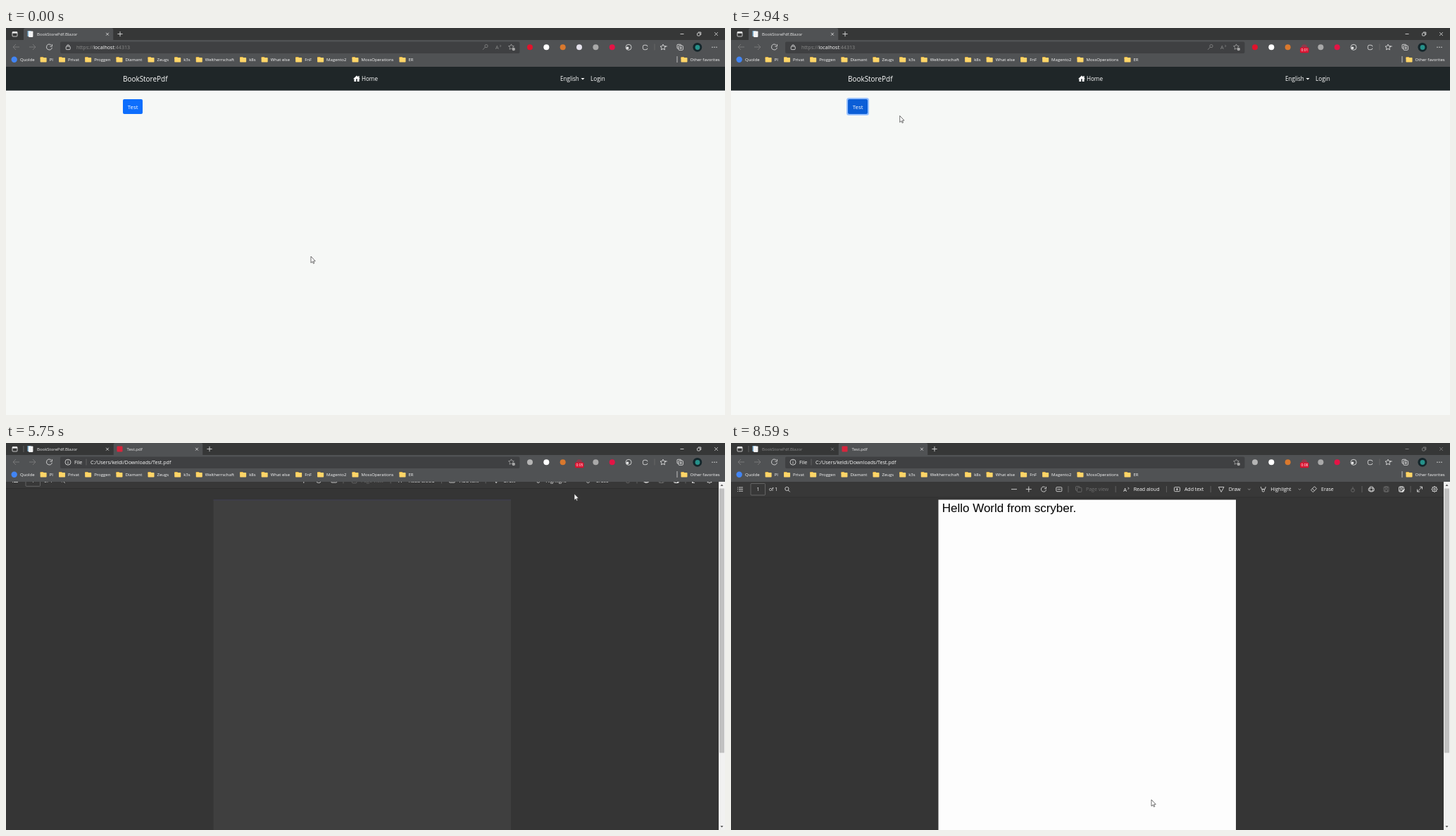
An HTML page with a canvas that plays this animation: 1021 px wide and 549 px high, repeating every 8.62 s.

```html
<!DOCTYPE html>
<html lang="en">
<head>
<meta charset="utf-8">
<title>Browser PDF download</title>
<style>
html, body { margin: 0; width: 100%; height: 100%; overflow: hidden; background: #353535; }
canvas { display: block; width: 1021px; height: 549px; }
</style>
</head>
<body>
<canvas id="stage" width="1021" height="549"></canvas>
<script>
const W = 1021, H = 549, LOOP = 8620;
const c = document.getElementById('stage').getContext('2d');
const UI = '"Open Sans", "Noto Sans", sans-serif';
const PDF_FONT = '"Liberation Sans", Arial, sans-serif';
const LIGHT = '#ececec', DIM = '#8a8a8a', FAINT = '#707070';
const BAR = '#505254', TITLE = '#363737', FIELD = '#3f4042', PAPER = '#f6f8f6';

// Moments at which the state changes, in ms
const CLICK = 1750, DOWNLOAD = 3500, OPEN = 5370, DARK = 5560,
  SHRINK = 5640, SLIDE = 5700, RENDER = 5930, BLUR = 8540;

// Cursor stops: time, x, y
const stops = [
  [40, 433, 324], [830, 183.6, 117], [2750, 183.6, 117], [3660, 451, 153],
  [5000, 807, 72], [7130, 807, 72], [7560, 663.5, 337], [8300, 597, 506]
];
const bookmarks = ['PI', 'Privat', 'Proggen', 'Diamant', 'Zeugs', 'k3s', 'Weltherrschaft',
  'k8s', 'What else', 'FnF', 'Magento2', 'MossOperations', 'ER'];

const clamp = v => Math.max(0, Math.min(1, v));
const mix = (a, b, k) => a + (b - a) * k;

function box(x, y, w, h, fill, r = 0) {
  c.beginPath();
  c.roundRect(x, y, w, h, r);
  c.fillStyle = fill;
  c.fill();
}
function pen(color, width = 0.8) {
  c.strokeStyle = color;
  c.lineWidth = width;
  c.stroke();
}
function frame(x, y, w, h, color = LIGHT, r = 1) {
  c.beginPath();
  c.roundRect(x, y, w, h, r);
  pen(color);
}
function trace(x, y, pts) {
  c.beginPath();
  for (let i = 0; i < pts.length; i += 2) c.lineTo(x + pts[i], y + pts[i + 1]);
}
function line(x, y, pts, color = LIGHT, width) {
  trace(x, y, pts);
  pen(color, width);
}
function shape(x, y, pts, color) {
  trace(x, y, pts);
  c.closePath();
  c.fillStyle = color;
  c.fill();
}
function ring(x, y, r, color = LIGHT, from = 0, to = Math.PI * 2) {
  c.beginPath();
  c.arc(x, y, r, from, to);
  pen(color);
}
function dot(x, y, r, color = LIGHT) {
  c.beginPath();
  c.arc(x, y, r, 0, 7);
  c.fillStyle = color;
  c.fill();
}
// Returns the right edge of the text
function text(s, x, y, size = 6, color = '#fafafa', font = UI) {
  c.font = `${size}px ${font}`;
  c.fillStyle = color;
  c.fillText(s, x, y);
  return x + c.measureText(s).width;
}

// Small icons, each centred on x, y
function minus(x, y, r, color) {
  line(x, y, [-r, 0, r, 0], color);
}
function plus(x, y, r, color) {
  minus(x, y, r, color);
  line(x, y, [0, -r, 0, r], color);
}
function cross(x, y, r, color) {
  line(x, y, [-r, -r, r, r], color);
  line(x, y, [-r, r, r, -r], color);
}
function chevron(x, y) {
  line(x, y, [-1.7, -0.8, 0, 0.9, 1.7, -0.8], '#aaa');
}
function divider(x, y, color = '#6c6c6c') {
  line(x, y, [0, -4.5, 0, 4.5], color);
}
function triangle(x, y, w, h, color) {
  shape(x, y, [-w, 0, w, 0, 0, h], color);
}
function arrow(x, y, dir) {
  line(x, y, [-5 * dir, 0, 4 * dir, 0], '#808080');
  line(x, y, [0, -4, 4 * dir, 0, 0, 4], '#808080');
}
function reload(x, y, r) {
  ring(x, y, r, LIGHT, 0.2, 5.4);
  line(x, y, [r, -r, r, -r / 4, r / 4, -r / 4]);
}
function star(x, y, r, color = LIGHT) {
  c.beginPath();
  for (let i = 0; i < 10; i++) {
    const a = i * Math.PI / 5 - Math.PI / 2, d = i % 2 ? r / 2 : r;
    c.lineTo(x + Math.cos(a) * d, y + Math.sin(a) * d);
  }
  c.closePath();
  pen(color);
}
function folder(x, label) {
  box(x - 4.5, 41, 4.5, 3, '#e5b443', 0.6);
  box(x - 4.5, 42, 9, 6.4, '#ffd568', 0.7);
  return text(label, x + 8.5, 47);
}
function pages(x, y, color, fill) {
  frame(x - 4, y - 4, 5.6, 5.8, color);
  box(x - 2, y - 2.2, 6.4, 6.2, fill);
  frame(x - 2, y - 2.2, 6.4, 6.2, color);
}
function letterA(x, y, color) {
  text('A', x - 4, y + 3, 7.4, color);
  line(x + 2.5, y - 1.5, [0, -1.5, 1.2, 0, 0, 1.5], color);
}
function disk(x, y, color) {
  frame(x - 3.5, y - 3.5, 7, 7, color);
  frame(x - 1.8, y - 3.5, 3.6, 2.2, color, 0);
  frame(x - 2, y + 0.5, 4, 3, color, 0);
}

function cursorAt(t) {
  const i = stops.findIndex(s => s[0] > t);
  if (i < 0) return stops[stops.length - 1].slice(1);
  const b = stops[i], a = stops[Math.max(0, i - 1)];
  const k = clamp((t - a[0]) / (b[0] - a[0]));
  return [mix(a[1], b[1], k), mix(a[2], b[2], k)];
}

function drawCursor(x, y, hand) {
  if (hand) {
    c.beginPath();
    c.roundRect(x - 1, y, 2.2, 8, 1);
    c.roundRect(x - 3, y + 5, 8, 7.5, 2);
    pen('#222', 1.4);
    c.fillStyle = '#fff';
    c.fill();
    return;
  }
  shape(x, y, [0, 0, 0, 9.2, 2.1, 7.3, 3.5, 10.2, 4.8, 9.6, 3.5, 6.8, 6.2, 6.6], '#fff');
  pen('#333', 0.7);
}

function pageIcon(x) {
  box(x - 3.5, 4, 5, 8, '#80b4d6', 0.6);
  box(x - 2, 4.5, 6.4, 8.4, '#f4f4f4', 0.8);
}
function redIcon(x) {
  box(x - 4, 4.5, 8, 8, '#d7263d', 1);
}
function tab(x, w, active, label, color, icon) {
  c.save();
  c.beginPath();
  c.rect(x, 0, w, 18);
  c.clip();
  if (active) box(x, 0, w, 22, BAR, 3);
  icon(x + 9);
  text(label, x + 19, 10.7, 6, color);
  cross(x + w - 8.5, 8.7, 1.9, color);
  c.restore();
}

function drawTabs(t) {
  const opened = t >= OPEN, color = t >= BLUR ? '#8c8c8c' : LIGHT;
  const w = opened ? 127 * (1 - (1 - clamp((t - 5440) / 230)) ** 3) : 0;
  box(0, 0, W, 18, TITLE);
  frame(9, 5.4, 7, 6.6);
  box(9, 5.4, 7, 2.2, LIGHT);
  tab(25, 127.5, !opened, 'BookStorePdf.Blazor', color, pageIcon);
  if (opened) {
    divider(25, 8.5);
    if (w > 1) tab(152.5, w, true, 'Test.pdf', LIGHT, redIcon);
    else line(152, 8.7, [-0.7, -2, 0.9, 0, -0.7, 2]);
  }
  plus(162 + w, 8.5, 3.6);
  minus(960, 8.5, 2.5, color);
  frame(981.6, 7, 4, 4, color);
  line(983, 6, [0, 0, 3.8, 0, 3.8, 4], color);
  cross(1008.5, 8.5, 2.3, color);
}

function drawAddress(t, shift) {
  arrow(14, 27, -1);
  arrow(38, 27, 1);
  if (t >= OPEN && t < DARK) cross(61.5, 27, 2.8);
  else reload(61.5, 27, 3.9);
  box(77, 19.5, 652.5 + shift, 16.5, FIELD, 2);
  if (t >= OPEN) {
    ring(88, 27.2, 4);
    line(88, 27, [0, -0.5, 0, 2.5]);
    dot(88, 25, 0.5);
    text('File', 97, 29.6, 7.1);
    divider(114, 27);
    text('C:/Users/keldi/Downloads/Test.pdf', 120, 29.6, 7.1);
  } else {
    frame(85.2, 26, 6, 4.6);
    ring(88.2, 25.7, 1.8, LIGHT, Math.PI);
    let x = text('https://', 100, 29.6, 7.1, DIM);
    x = text('localhost', x, 29.6, 7.1);
    text(':44313', x, 29.6, 7.1, DIM);
    ring(682 + shift, 25.6, 2.1, DIM);
    line(680.5 + shift, 27, [0, 0, -3.4, 3.8], DIM);
    letterA(699 + shift, 27, DIM);
  }
  star(717.5 + shift, 27, 4.1, '#a5a5a5');
  dot(720.8 + shift, 30, 2.2, '#a5a5a5');
}

function drawExtensions(t, shift) {
  const slot = i => 744 + 23.35 * i + shift;
  const count = t < DOWNLOAD + 300 ? Math.min(1, Math.floor(t / 950)) : Math.floor(t / 1000);
  const colors = [t < OPEN ? '#e0132c' : '#b5b5b5', '#fff', '#d9782d',
    count ? '#8c3a4a' : '#e4e1ec', '#a9a9a9', '#e31445'];
  colors.forEach((color, i) => dot(slot(i), 27.3, 4, color));
  if (count) {
    box(slot(3) - 6, 27.6, 12.4, 7.6, '#dc1230', 1.5);
    text('0:0' + count, slot(3) - 4.6, 33.4, 5, '#fff');
  }
  ring(slot(6), 27.3, 4);
  dot(slot(6) - 1.5, 28.3, 1.7);
  frame(slot(7) - 3, 24.3, 6.4, 6.4, LIGHT, 2);
  dot(slot(7) + 3.5, 27.5, 1.3, BAR);
  divider(921 + shift, 27);
  star(933 + shift, 27.4, 4.2);
  minus(937 + shift, 26, 1.8);
  pages(957 + shift, 27.3, LIGHT, BAR);
  plus(958.2 + shift, 28.2, 1.8);
  if (shift) {
    if (t < OPEN) box(947, 19, 20.5, 17, '#696a6b', 2);
    line(957.2, 23, [0, 0, 0, 6.2]);
    line(957.2, 29, [-2.6, -2.6, 0, 0, 2.6, -2.6]);
    minus(957.2, 31.7, 3.2);
  }
  dot(981.8, 27.3, 6.4, '#14262b');
  dot(982, 27.5, 3.4, '#25918a');
  for (let i = -1; i < 2; i++) dot(1006 + i * 3, 27.2, 0.7);
}

function drawBookmarks() {
  dot(11.7, 44.8, 4.2, '#4285f4');
  let x = text('Quolde', 20, 47);
  for (const label of bookmarks) x = folder(x + 12.6, label);
  divider(953, 44.5, '#ddd');
  folder(963, 'Other favorites');
}

function drawSite(t, hover) {
  box(0, 55, W, 494, PAPER);
  box(0, 55, W, 33.8, '#1f2628');
  text('BookStorePdf', 166, 75.8, 9.95, '#fff');
  triangle(498, 72.2, 5, -4.6, '#fff');
  box(494.4, 71.5, 2.8, 4.5, '#fff');
  box(498.8, 71.5, 2.8, 4.5, '#fff');
  box(500.2, 68, 1.4, 3, '#fff');
  text('Home', 505, 75, 8.1, '#fff');
  text('English', 787, 75, 8.1, '#fff');
  triangle(819, 71, 2.5, 2.5, '#fff');
  text('Login', 830, 75, 8.2, '#fff');
  const focus = t >= CLICK;
  if (focus) box(164, 99, 32, 25, '#98c1fe', 3.5);
  box(166, 101, 28, 21, focus || hover ? '#0b5ed7' : '#0d6efd', 2);
  text('Test', 172.8, 114.8, 7.8, '#fff');
}

const tools = [
  { label: 'Page view', color: FAINT, icon: x => pages(x, 65.5, FAINT, '#383838') },
  { label: 'Read aloud', icon: x => letterA(x, 65.8) },
  { label: 'Add text', icon: x => { frame(x - 4, 62.7, 8, 6); plus(x, 65.7, 1.7); } },
  { label: 'Draw', menu: true, icon: x => line(x, 65.5, [-3.8, -3, 3.8, -3, 0, 4, -3.8, -3]) },
  { label: 'Highlight', menu: true, icon: x => {
    line(x, 65.5, [-3.5, -3.5, -2.4, 0, 2.4, 0, 3.5, -3.5]);
    frame(x - 1.5, 65.5, 3, 3.5);
  } },
  { label: 'Erase', icon: x => {
    line(x, 65.7, [-4, 1, 1, -4, 4, -1, -1, 4, -4, 1]);
    line(x, 65.7, [-2, -1, 1, 2]);
  } }
];

function drawPdfBar() {
  const y = 65.6;
  box(0, 55, 1012, 22, '#383838');
  box(0, 76.7, 1012, 0.6, '#2b2b2b');
  for (let i = -1; i < 2; i++) {
    dot(9.5, y + i * 2.6, 0.5);
    minus(14, y + i * 2.6, 3);
  }
  frame(28, 57.5, 20.5, 16.5, FAINT);
  text('1', 36.5, 68.3, 7);
  text('of 1', 54, 68.3, 6.8);
  ring(79.4, 65, 2.6);
  line(81.3, 67, [0, 0, 2.4, 2.4]);
  minus(402, y, 4);
  plus(422.8, y, 4);
  reload(444, y, 3.5);
  frame(461.8, 62.7, 8, 6);
  minus(465.8, y, 2.4);

  divider(479, y);
  let x = 493.5;
  for (const { label, icon, menu, color } of tools) {
    icon(x);
    const end = text(label, x + 10.5, 68.3, 7, color);
    if (menu) chevron(end + 12, y);
    else if (label !== 'Erase') divider(end + 10, y);
    x = end + (menu ? 32 : 25);
  }

  ring(883, 67, 2.4, FAINT);
  line(883, 62, [0, 0, 0, 4], FAINT);
  divider(896, y);
  frame(905.3, 64, 8, 4);
  frame(907, 62, 4.6, 7);
  disk(930.5, y, FAINT);
  disk(952, y, LIGHT);
  line(954.5, 67.5, [-2, 2, 2, -2], LIGHT, 1.2);
  divider(965, y);
  line(978, y, [-3.5, 3.5, 3.5, -3.5]);
  for (const s of [-1, 1]) line(978, y, [0, 3.5 * s, -3.5 * s, 3.5 * s, -3.5 * s, 0]);
  ring(999, y, 3.4);
  ring(999, y, 1.3);
  for (let a = 0; a < 6; a += Math.PI / 4) dot(999 + Math.cos(a) * 3.9, y + Math.sin(a) * 3.9, 0.6);
}

function drawPdf(t) {
  const ready = t >= RENDER;
  box(0, 55, W, 494, '#353535');
  box(294.5, 80.5, 422.5, 469, ready ? '#fdfdfd' : '#3f3f3f');
  if (ready) text('Hello World from scryber.', 299.7, 98, 17, '#000', PDF_FONT);
  else box(294.5, 80.5, 422.5, 0.8, '#41415c');
  if (t >= SLIDE) {
    c.save();
    c.translate(0, -22 * (1 - clamp((t - SLIDE) / 120)));
    drawPdfBar();
    c.restore();
  }
  box(1012, 55, 9, 494, '#f1f1f1');
  box(1013, 64.5, 7, 375, '#c1c1c1');
  triangle(1016.5, 61, 2, -2.4, '#555');
  triangle(1016.5, 543, 2, 2.4, '#555');
}

function draw(t) {
  const [x, y] = cursorAt(t);
  const hover = t < OPEN && x > 166 && x < 194 && y > 101 && y < 122;
  const shift = t >= DOWNLOAD && t < SHRINK ? -23.35 : 0;
  if (t < OPEN) drawSite(t, hover);
  else if (t < DARK) box(0, 55, W, 494, PAPER);
  else drawPdf(t);
  drawTabs(t);
  box(0, 17, W, 38, BAR);
  drawAddress(t, shift);
  drawExtensions(t, shift);
  drawBookmarks();
  drawCursor(x, y, hover);
}

const start = performance.now();
function tick() {
  draw((performance.now() - start) % LOOP);
  requestAnimationFrame(tick);
}
tick();
</script>
</body>
</html>
```
